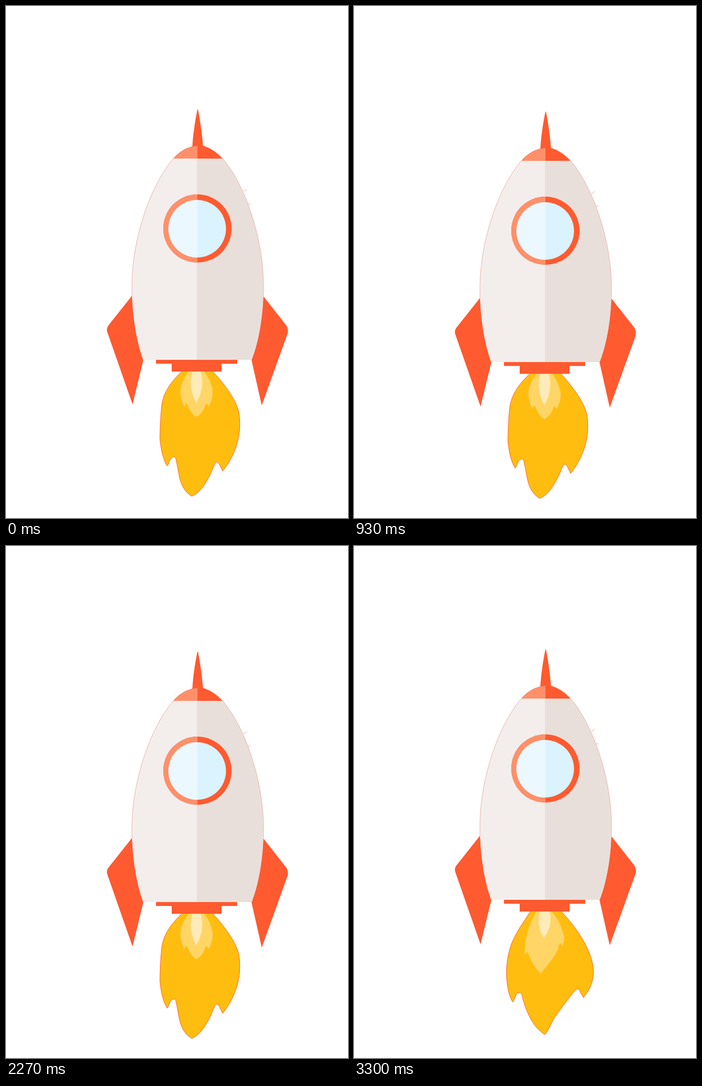
Recreate the animation shown at these times as an HTML page. Size 611 px wide and 916 px high, loop 3330 ms.

```html
<!DOCTYPE html>
<html lang="en">
<head>
<meta charset="utf-8">
<title>Rocket</title>
<style>
  html, body { margin: 0; width: 100%; height: 100%; overflow: hidden; background: #fff; }
  svg { display: block; width: 611px; height: 916px; }
  .red { fill: #ff5a30; }
  .fin { fill: #ff5a30; stroke: #ff4a28; stroke-width: .8; }
  .pale { fill: #ff9069; }
  .edge { fill: none; stroke: #e9b5aa; stroke-width: 1; }
  .outer { fill: #ffbd10; stroke: #ff5a2c; stroke-width: .9; }
  .inner { fill: #ffd566; }
  .core { fill: #ffebb9; }
</style>
</head>
<body>
<svg viewBox="0 0 611 916">
  <g id="rocket">
    <g id="flames"></g>

    <path class="fin" d="M225 519L183 572Q179 578 182 585L226 711L245 633C232 597 226 550 225 519Z"/>
    <path class="fin" d="M460 520L500 571Q504 576 503 585L457 713L439 633C453 597 459 550 460 520Z"/>
    <path class="red" d="M268 633H413V640H385V654H296V640H268Z"/>

    <path fill="#f3eeec" d="M299 273C262 315 225 410 225 502C225 550 232 597 245 633H341V273Z"/>
    <path fill="#e9dfda" d="M387 273C424 315 460 410 460 502C460 550 453 597 439 633H341V273Z"/>
    <path class="edge" d="M299 273C262 315 225 410 225 502V519M387 273C424 315 460 410 460 502V519"/>
    <path class="edge" d="M424 331H427L430 327M433 354H437"/>

    <path class="red" d="M342 185C338 204 334 230 333 251C319 255 308 262 299 273H387C377 262 366 254 352 250C350 225 346 200 343 185Z"/>
    <path class="pale" d="M342 250C325 252 310 260 300 273H342Z"/>

    <circle class="red" cx="342" cy="398" r="61"/>
    <path class="pale" d="M342 337A61 61 0 0 0 342 459Z"/>
    <circle fill="#daf3ff" cx="341.5" cy="398.5" r="51.5"/>
    <path fill="#ebf8ff" d="M342 347A51.5 51.5 0 0 0 342 450Z"/>
  </g>
</svg>
<script>
const LOOP = 3330, COUNT = 100;

// Each flame: outer, inner, core
const round = [
  'M316 652C297 670 281 689 278 716C276 735 275 760 275 775C277 795 281 812 288 823C292 817 293 808 298 807C303 806 303 808 304 813C308 830 309 845 314 856C318 866 326 874 332 877C344 872 352 861 359 849C366 838 370 825 374 817C377 814 381 818 382 822L387 832C400 817 414 790 417 762C418 748 418 740 416 727C411 703 388 674 368 652Z',
  'M326 654C316 668 310 682 312 695C313 705 316 712 319 717L322 710C326 716 330 730 340 735C350 731 354 720 358 711L362 717C367 708 370 698 369 688C367 675 362 664 354 654Z',
  'M333 654C328 672 329 690 340 710C351 692 353 672 348 654Z'
];
const swayed = [
  'M316 652C300 667 284 683 281 702C277 720 277 740 282 762C286 781 291 795 298 803C301 797 305 787 309 787C313 787 314 794 316 799C324 820 340 835 357 847C364 838 368 829 372 820C377 811 385 797 390 796C394 796 395 798 396 802L402 811C411 799 419 781 419 763C418 740 406 720 397 704C390 687 382 669 368 652Z',
  'M326 654C314 673 308 700 311 730L315 724C319 733 320 747 327 755C331 744 339 743 349 737C358 732 361 725 363 718C367 717 369 723 371 727C376 720 375 710 373 702C368 683 362 665 352 654Z',
  'M332 654C328 672 327 690 337 707C347 693 353 673 349 654Z'
];
const wide = [
  'M316 652C305 671 285 695 278 722C272 745 271 765 274 785C276 799 279 810 284 816C288 809 289 799 295 799C299 799 300 803 301 808C309 838 322 863 341 874C350 864 353 850 361 840C373 823 386 806 395 795C401 790 403 794 404 798L410 808C420 796 428 780 428 761C427 740 418 718 403 695C392 678 380 664 369 652Z',
  'M326 654C316 670 304 700 305 731L310 726C315 741 324 757 334 765C343 752 357 738 364 723C366 716 366 710 369 711C370 712 371 714 372 716C377 706 376 696 372 688C368 674 361 662 353 654Z',
  'M333 654C328 668 328 684 339 701C350 688 354 668 349 654Z'
];

// Halfway between two paths of the same structure
function blend(a, b) {
  const nums = b.match(/\d+/g);
  let i = 0;
  return a.replace(/\d+/g, n => (+n + +nums[i++]) / 2);
}

// Vertical offset, eased between alternating high and low points
const turns = [0, 16, 32, 48, 64, 80, 100];
function drop(frame) {
  const i = turns.findIndex((t, k) => frame >= t && frame < turns[k + 1]);
  const p = (frame - turns[i]) / (turns[i + 1] - turns[i]);
  const ease = (1 - Math.cos(Math.PI * p)) / 2;
  return Math.round(25 * (i % 2 ? 1 - ease : ease));
}

// Stepped endless animation from a style for each frame
function play(el, style) {
  const keys = Array.from({ length: COUNT }, (_, f) => ({
    ...style(f),
    offset: Math.round(f * 10 / 3) * 10 / LOOP,
    easing: 'step-end'
  }));
  keys.push({ ...style(COUNT - 1), offset: 1 });
  el.animate(keys, { duration: LOOP, iterations: Infinity });
}

const flames = document.getElementById('flames');
const cycle = [round, swayed, swayed.map((d, i) => blend(d, wide[i])), wide];
cycle.forEach((paths, n) => {
  const g = document.createElementNS('http://www.w3.org/2000/svg', 'g');
  g.innerHTML = ['outer', 'inner', 'core']
    .map((name, i) => `<path class="${name}" d="${paths[i]}"/>`).join('');
  flames.append(g);
  play(g, f => ({ visibility: f % 4 === n ? 'visible' : 'hidden' }));
});

play(document.getElementById('rocket'),
  f => ({ transform: `translateY(${drop(f)}px)` }));
</script>
</body>
</html>
```
